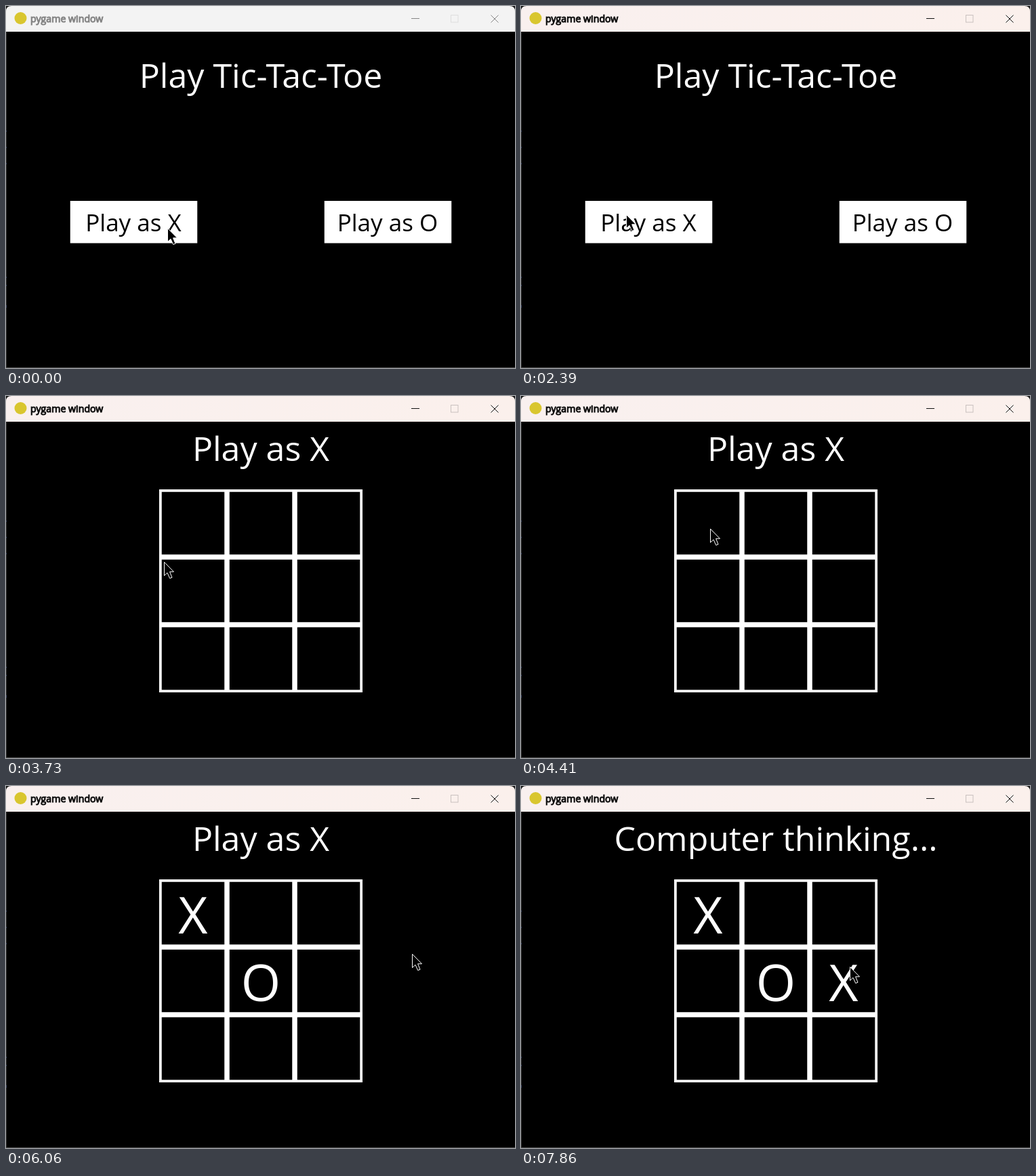
Animation, 751 px wide and 535 px high, one loop 8000 ms. Source, as an HTML page:

```html
<!DOCTYPE html>
<html lang="en">
<head>
<meta charset="utf-8">
<title>Tic-Tac-Toe</title>
<style>
html, body { margin: 0; width: 100%; height: 100%; overflow: hidden; background: #000; }
svg { display: block; width: 100vw; height: 100vh; }
text { font-family: "Open Sans", "Noto Sans", sans-serif; fill: #fff; }

.head { font-size: 50px; text-anchor: middle; }
.label { font-size: 35px; text-anchor: middle; fill: #000; }
.mark { font-size: 75px; text-anchor: middle; }
.caption { font-size: 14.2px; }
.button { fill: #fff; }
.tile { fill: none; stroke: #fff; stroke-width: 3.75; }
.icons { fill: none; stroke-width: 1; }

/* every change is a hard cut on one shared clock */
.anim { animation: 8s step-end infinite; }
.idle { animation-name: idle; }
.focus { animation-name: focus; }
.menu { animation-name: menu; }
.board { animation-name: board; }
.turn { animation-name: turn; }
.think { animation-name: think; }
.x1 { animation-name: x1; }
.o1 { animation-name: o1; }
.x2 { animation-name: x2; }
.cursor { animation-name: move; }

@keyframes idle  { 0% { opacity: 1 } 6.25% { opacity: 0 } }
@keyframes focus { 0% { opacity: 0 } 6.25% { opacity: 1 } }
@keyframes menu  { 0% { opacity: 1 } 36.75% { opacity: 0 } }
@keyframes board { 0% { opacity: 0 } 36.75% { opacity: 1 } }
@keyframes turn  { 0% { opacity: 1 } 58.625% { opacity: 0 } 73.875% { opacity: 1 } 98.25% { opacity: 0 } }
@keyframes think { 0% { opacity: 0 } 58.625% { opacity: 1 } 73.875% { opacity: 0 } 98.25% { opacity: 1 } }
@keyframes x1    { 0% { opacity: 0 } 58.625% { opacity: 1 } }
@keyframes o1    { 0% { opacity: 0 } 73.875% { opacity: 1 } }
@keyframes x2    { 0% { opacity: 0 } 98.25% { opacity: 1 } }

@keyframes move {
  0%      { transform: translate(238px, 328px) }
  9.625%  { transform: translate(239px, 328px) }
  11.125% { transform: translate(241px, 328px) }
  13%     { transform: translate(262px, 322px) }
  14.5%   { transform: translate(294px, 312px) }
  16%     { transform: translate(290px, 308px) }
  26.875% { transform: translate(258px, 296px) }
  28.375% { transform: translate(192px, 293px) }
  29.875% { transform: translate(155px, 308px) }
  38.25%  { transform: translate(161px, 318px) }
  39.75%  { transform: translate(170px, 329px) }
  43.375% { transform: translate(180px, 316px) }
  45%     { transform: translate(205px, 283px) }
  46.5%   { transform: translate(233px, 245px) }
  48.125% { transform: translate(258px, 211px) }
  49.625% { transform: translate(272px, 196px) }
  53.25%  { transform: translate(277px, 196px) }
  55.125% { transform: translate(279px, 196px) }
  60.125% { transform: translate(447px, 222px) }
  62%     { transform: translate(436px, 171px) }
  63.75%  { transform: translate(478px, 185px) }
  65.375% { transform: translate(555px, 222px) }
  66.875% { transform: translate(607px, 244px) }
  75.75%  { transform: translate(599px, 248px) }
  81%     { transform: translate(566px, 255px) }
  82.625% { transform: translate(530px, 262px) }
  84.5%   { transform: translate(511px, 268px) }
  86.375% { transform: translate(496px, 268px) }
  88.125% { transform: translate(491px, 271px) }
  91.25%  { transform: translate(486px, 261px) }
  93.125% { transform: translate(484px, 256px) }
  94.875% { transform: translate(484px, 261px) }
  96.375% { transform: translate(485px, 267px) }
}
</style>
</head>
<body>
<svg viewBox="0 0 751 535" preserveAspectRatio="none">
  <defs>
    <linearGradient id="warm">
      <stop offset="0" stop-color="#f9f0ef"/>
      <stop offset="1" stop-color="#fbf0ec"/>
    </linearGradient>
    <path id="bar" d="M0 38V8Q0 0 8 0H743Q751 0 751 8V38Z"/>
    <g id="caption">
      <text class="caption" x="36" y="24" style="fill:inherit">pygame window</text>
      <path d="M598 18.5H610M715.5 13.5L726.5 24.5M726.5 13.5L715.5 24.5"/>
    </g>
    <rect id="max" x="656.5" y="13.5" width="10.5" height="10.5"/>
  </defs>

  <!-- window frame -->
  <rect width="751" height="535" fill="#1c1c1c"/>
  <rect y="38" width="1" height="497" fill="#353535"/>
  <path d="M.5 184v2m0 22v2m0 22v2m0 166v2m0 10v2m0 28v4" stroke="#46506e"/>
  <rect x="1" y="38" width="750" height="496" fill="#000"/>
  <rect y="534" width="751" height="1" fill="#484848"/>

  <g class="anim idle">
    <use href="#bar" fill="#f3f3f3"/>
    <g class="icons">
      <use href="#max" stroke="#dedede"/>
      <use href="#caption" stroke="#858585" style="fill:#858585"/>
    </g>
  </g>
  <g class="anim focus">
    <use href="#bar" fill="url(#warm)"/>
    <g class="icons">
      <use href="#max" stroke="#c9c1bf"/>
      <use href="#caption" stroke="#111" style="fill:#111"/>
    </g>
  </g>
  <circle cx="21.5" cy="18" r="9" fill="#d9c62f"/>

  <g class="anim menu">
    <text class="head" x="376" y="120.8">Play Tic-Tac-Toe</text>
    <rect class="button" x="94.75" y="288" width="187.5" height="62.5"/>
    <rect class="button" x="469.75" y="288" width="187.5" height="62.5"/>
    <text class="label" x="188" y="333">Play as X</text>
    <text class="label" x="563" y="333">Play as O</text>
  </g>

  <g class="anim board">
    <g id="grid"></g>
    <text class="head anim turn" x="376" y="95.8">Play as X</text>
    <text class="head anim think" x="376" y="95.8">Computer thinking...</text>
    <text class="mark anim x1" x="276" y="218">X</text>
    <text class="mark anim o1" x="376" y="318">O</text>
    <text class="mark anim x2" x="476" y="318">X</text>
  </g>

  <path class="anim cursor" fill="#000" stroke="#fff"
    d="M.5 .5V20.5L5 16.3L8.7 24.5L12 23.2L8.6 14.8H14.5Z"/>
</svg>
<script>
const grid = document.getElementById('grid');
const line = 3.75, size = 100;
for (let i = 0; i < 9; i++) {
  const tile = document.createElementNS(grid.namespaceURI, 'rect');
  tile.setAttribute('class', 'tile');
  tile.setAttribute('x', 226 + i % 3 * size + line / 2);
  tile.setAttribute('y', 138 + Math.floor(i / 3) * size + line / 2);
  tile.setAttribute('width', size - line);
  tile.setAttribute('height', size - line);
  grid.append(tile);
}
</script>
</body>
</html>
```
